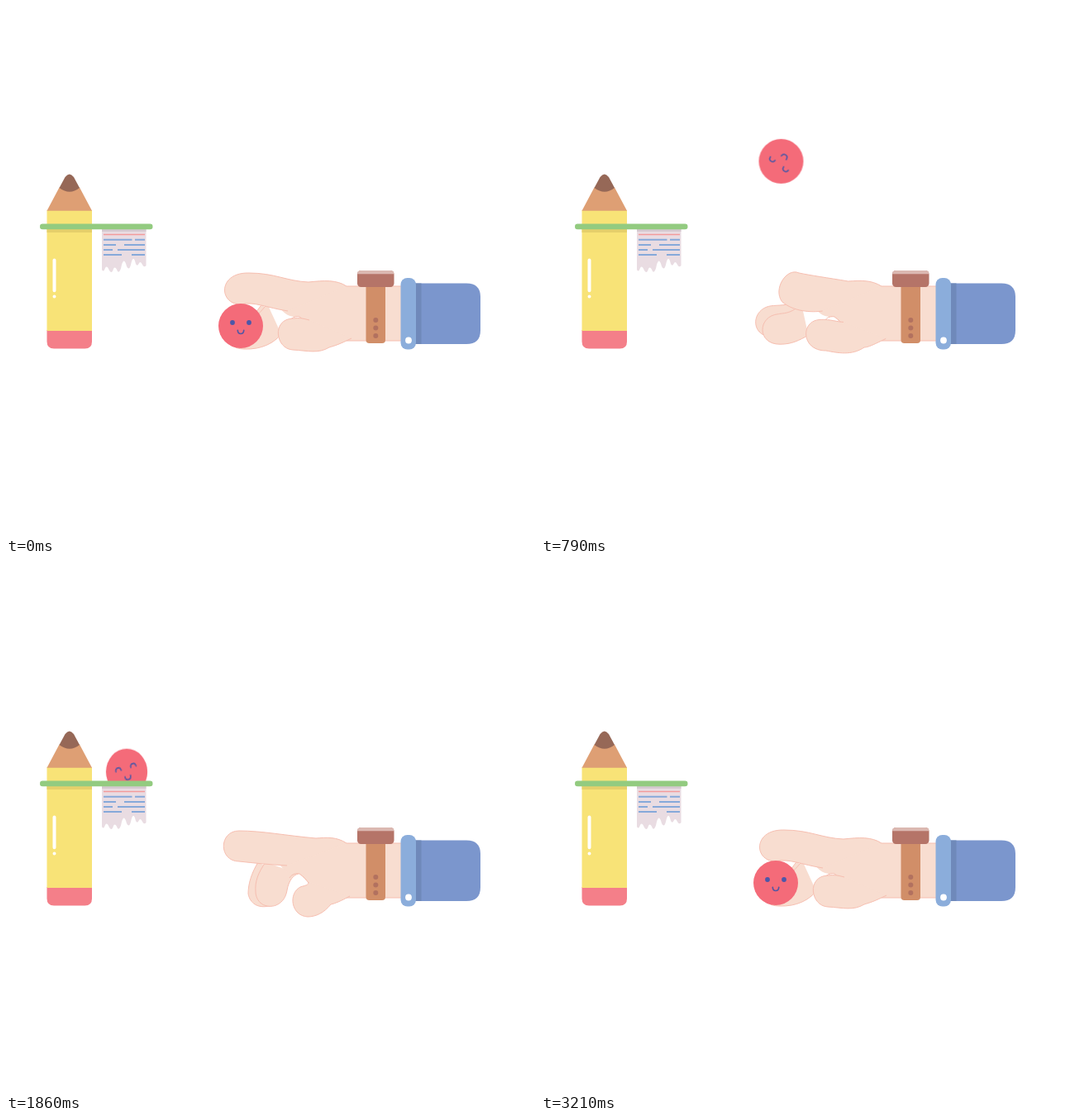
Recreate the animation shown at these times as an HTML page. Size 640 px wide and 640 px high, loop 3.37 s.

```html
<!DOCTYPE html>
<html lang="en">
<head>
<meta charset="utf-8">
<title>Desk basketball</title>
<style>
  html, body { margin: 0; width: 100%; height: 100%; overflow: hidden; background: #fff; }
  svg { display: block; width: 100vw; height: 100vh; }
  .skin { fill: #f8ddd0; stroke: #f6beb0; stroke-width: 1; stroke-linejoin: round; }
  .fill { stroke: none; }
  .line { fill: none; }
  .face { fill: none; stroke: #5457a3; stroke-width: 1.7; stroke-linecap: round; }
  .dots { fill: #4d57a8; stroke: none; }
  .text { fill: none; stroke: #86a9da; stroke-width: 2; }
</style>
</head>
<body>
<svg viewBox="0 0 640 640">
  <g id="hand">
    <path class="skin" id="far"/>
    <path class="skin" id="near"/>
    <path class="skin fill" d="M480 339H412L370 334L332 345V366C338 374 345 377 355 376L366 387L395 405H480Z"/>
    <path class="skin line" d="M480 339H412M480 405H412M343 381C346 376 352 375 355 376C360 379 364 384 366 387"/>
    <path class="skin" id="index"/>
    <path class="skin" id="thumb"/>
    <rect x="435.5" y="334" width="23.5" height="74" rx="4" fill="#d18e68"/>
    <g fill="#b2715f">
      <circle cx="447.3" cy="380" r="3"/>
      <circle cx="447.3" cy="389.5" r="3"/>
      <circle cx="447.3" cy="399" r="3"/>
    </g>
    <rect x="425" y="320" width="44.5" height="20" rx="4.5" fill="#b57468"/>
    <path d="M425 324.3Q425.3 320 429.5 320H465Q469.2 320 469.5 324.3Z" fill="#dbb8b1"/>
    <path d="M495 335.5H557Q574 335.5 574 352V392.5Q574 409 557 409H495Z" fill="#7b96cd"/>
    <rect x="495" y="335.5" width="7.5" height="73.5" fill="#6f89ba"/>
    <rect x="477.5" y="329" width="18.5" height="86.5" rx="8" fill="#8baddb"/>
    <circle cx="487" cy="404.5" r="3.9" fill="#fff"/>
  </g>

  <ellipse id="spark" rx="2.4" ry="1.3" fill="#fad98c"/>

  <g id="ball">
    <circle r="27" fill="#f46b79"/>
    <g id="face" class="face">
      <g id="awake" class="dots"><circle cx="-10" cy="-4" r="2.9"/><circle cx="10" cy="-4" r="2.9"/></g>
      <path id="happy" d="M-13.5 -3.5c0 -5 7 -5 7 0M6.5 -3.5c0 -5 7 -5 7 0"/>
      <path d="M-3.7 5.3c0 5.6 7.4 5.6 7.4 0"/>
    </g>
  </g>

  <g id="net">
    <path fill="#e9dce2" d="M116 268V319Q118 323 120 317Q122 313 125 320Q128 325 130 318Q132 314 135 321Q138 324 140 313Q143 303 146 315Q149 321 151 313Q154 299 157 312Q159 316 161 311Q163 308 165 313Q167 317 169.5 314V268Z"/>
    <rect x="116" y="269" width="53.5" height="4" fill="#d5c9cf"/>
    <path class="text" d="M118 276.5H168" style="stroke:#f39a9b;stroke-width:1.6"/>
    <path class="text" d="M118 282.7H152.500M156 282.700H168M118 289H133M143 289H168M118 295H129M135 295H168M118 301H140M152 301H168"/>
  </g>

  <path d="M49.500 392H104V406Q104 414.500 95.500 414.500H58Q49.500 414.500 49.500 406Z" fill="#f47f89"/>
  <rect x="49.5" y="247" width="54.5" height="146" fill="#f8e377"/>
  <rect x="49.5" y="269" width="54.5" height="5" fill="#e5cf6a"/>
  <path d="M49.500 247.700L64.500 219.500H89L104 247.700Z" fill="#de9f74"/>
  <path d="M64.500 220L71.500 207Q76.700 200 82 207L89 220Q77 229.500 64.500 220Z" fill="#966857"/>
  <path d="M58.500 307.500V344.200M58.500 351.500V351.600" stroke="#fff" stroke-width="4" stroke-linecap="round"/>
  <rect x="41" y="263.5" width="136.5" height="6.7" rx="3.3" fill="#93cb80"/>
</svg>
<script>
const LOOP = 3370, FPS = 14, LAST = 45;
const anims = [];

// keys: [ms, value, easing to the next key]
function play(id, prop, keys) {
  const frames = keys.map(([ms, value, easing = 'linear']) =>
    ({ offset: ms / LOOP, [prop]: value, easing }));
  const a = document.getElementById(id).animate(frames, { duration: LOOP, fill: 'both' });
  a.pause();
  anims.push(a);
}

const move = (x, y, sx = 1, sy = 1) => `translate(${x}px, ${y}px) scale(${sx}, ${sy})`;
const turn = deg => `rotate(${deg}deg)`;

// Hand poses: grip the ball, toss it, curl up, flick, then point
const poses = {
  far: {
    grip: 'M310 360C300 375 295 378 281 379C260 383 260 412 281 413C300 414 320 408 330 395',
    toss: 'M314 360C302 374 290 375 277 376C249 378 249 413 275 413.500C300 414 315 410 325 400',
    curl: 'M313 348C300 344 293 342 288 342C264 342 257 372 277 379C290 385 300 390 310 390',
    flick: 'M305 362C297 375 293 388 293 400C295 412 305 418 318 415C330 412 335 400 340 380'
  },
  near: {
    grip: 'M316 360C305 375 300 378 285 378C262 385 262 415 288 415C310 416 325 407 333 397',
    toss: 'M321 360C305 377 295 376 287 377C258 377 257 414 287 414C305 414 315 408 327 400',
    curl: 'M306 360C300 366 293 364 288 366C267 372 267 402 292 402C302 402 308 399 318 396',
    flick: 'M314 362C305 375 301 385 302 398C303 421 336 422 340 396C342 384 348 377 354 376'
  },
  index: {
    grip: 'M412 339C400 331 385 332 366 334C340 333 325 323 294 323C256 322 257 361 284 361C300 357 315 365 341 369',
    toss: 'M412 339C398 331 385 332 366 333C340 333 325 325 310 311C296 290 268 310 276 331C286 350 316 363 341 369',
    curl: 'M412 339C402 332 392 332 380 333C355 322 330 328 315 341C299 356 299 391 315 398C335 400 344 383 340 369',
    flick: 'M412 339C400 331 388 332 375 333C345 329 300 324 276 333C257 341 261 371 283 370C300 362 320 366 340 366',
    point: 'M412 339C400 331 388 332 375 333C340 330 310 324 282 324C257 324 257 361 282 361C300 363 320 365 340 366',
    raise: 'M412 339C400 331 388 332 375 333C350 333 310 325 283 320C259 317 255 353 278 357C300 360 320 364 340 366'
  },
  thumb: {
    grip: 'M418 402C404 409 398 411 391 413C378 421 365 417 347 416C326 415 321 379 347 378C355 377 360 378 367 380',
    toss: 'M418 402C400 411 395 413 391 413C375 420 362 417 350 415C318 415 318 376 343 377C352 376 360 378 366 380',
    curl: 'M416 403C400 411 395 413 391 413C378 428 355 424 337 420C308 421 306 384 333 383C345 383 358 389 366 386',
    flick: 'M416 403C405 409 398 412 393 413C385 423 375 428 365 428C345 427 341 400 356 392C362 390 366 390 366 386'
  }
};

for (const [id, p] of Object.entries(poses)) {
  const shape = name => `path("${p[name] || p.flick}")`;
  play(id, 'd', [
    [0, shape('grip')], [290, shape('grip')],
    [430, shape('toss')], [570, shape('toss'), 'ease-in-out'],
    [1070, shape('curl')], [1360, shape('curl'), 'ease-out'],
    [1500, shape('flick')], [1570, shape('flick')],
    [1860, shape('point')],
    [2430, shape('raise')], [2500, shape('raise'), 'ease-in-out'],
    [3070, shape('grip')], [LOOP, shape('grip')]
  ]);
}

play('hand', 'transform', [
  [0, move(0, 0), 'ease-in-out'], [290, move(32, 0)], [360, move(8, 0)],
  [430, move(-1, 0)], [570, move(-1, 0)], [640, move(0, 0)], [LOOP, move(0, 0)]
]);

play('ball', 'transform', [
  [0, move(284, 387), 'ease-in-out'], [290, move(316, 387)],
  [360, move(296, 350, 1.05, .95)], [430, move(290.5, 291, 1.09, .91)],
  [500, move(290.5, 226, .98, 1.02)], [570, move(290.5, 191), 'ease-out'],
  [710, move(290.5, 186), 'cubic-bezier(.33, 0, .67, .33)'],
  [1210, move(290.4, 258)], [1360, move(289, 303)],
  [1430, move(268, 260, 1.04, .96)], [1500, move(224, 203)],
  [1570, move(182.500, 159)], [1640, move(170, 153)], [1710, move(161, 186)],
  [1790, move(151, 225)], [1860, move(146, 252.500, .93, 1.03)],
  [1930, move(143, 270, .93, 1.03)], [2140, move(143, 297, .92, .98), 'ease-in'],
  [2290, move(148, 384)], [2360, move(186, 376)],
  [2430, move(225.2, 387), 'ease-out'], [2860, move(267.500, 387), 'ease-out'],
  [3210, move(284, 387)], [LOOP, move(284, 387)]
]);

play('face', 'transform', [
  [0, turn(0)], [290, turn(0)], [430, turn(77)], [1210, turn(380)],
  [1360, turn(420)], [1570, turn(225)], [1860, turn(-15)], [2140, turn(0)],
  [2430, turn(207), 'ease-out'], [3210, turn(360)], [LOOP, turn(360)]
]);

const blink = (a, b) => [[0, a], [350, a], [350, b], [2200, b], [2200, a], [LOOP, a]];
play('awake', 'opacity', blink(1, 0));
play('happy', 'opacity', blink(0, 1));

play('spark', 'transform', [
  [0, move(250, 215, 0, 0)], [1430, move(276, 252, 0, 0)], [1500, move(250, 213, 2, 2)],
  [1570, move(226.500, 177.700)], [1600, move(220, 170, 0, 0)], [LOOP, move(220, 170, 0, 0)]
]);

play('net', 'transform', [
  [0, move(0, 0)], [1860, move(0, 0)], [2210, move(0, -8, 1, 1.03)],
  [2430, move(0, -5.4, 1, 1.02)], [2640, move(0, 0)], [LOOP, move(0, 0)]
]);

// Hold each drawing for one step of the frame rate
const start = performance.now();
const stepTime = i => Math.round(i * 100 / FPS) * 10;
function draw() {
  const t = (performance.now() - start) % LOOP;
  let i = Math.min(LAST, Math.ceil(t * FPS / 1000));
  while (stepTime(i) > t) i--;
  for (const a of anims) a.currentTime = stepTime(i);
  requestAnimationFrame(draw);
}
draw();
</script>
</body>
</html>
```
